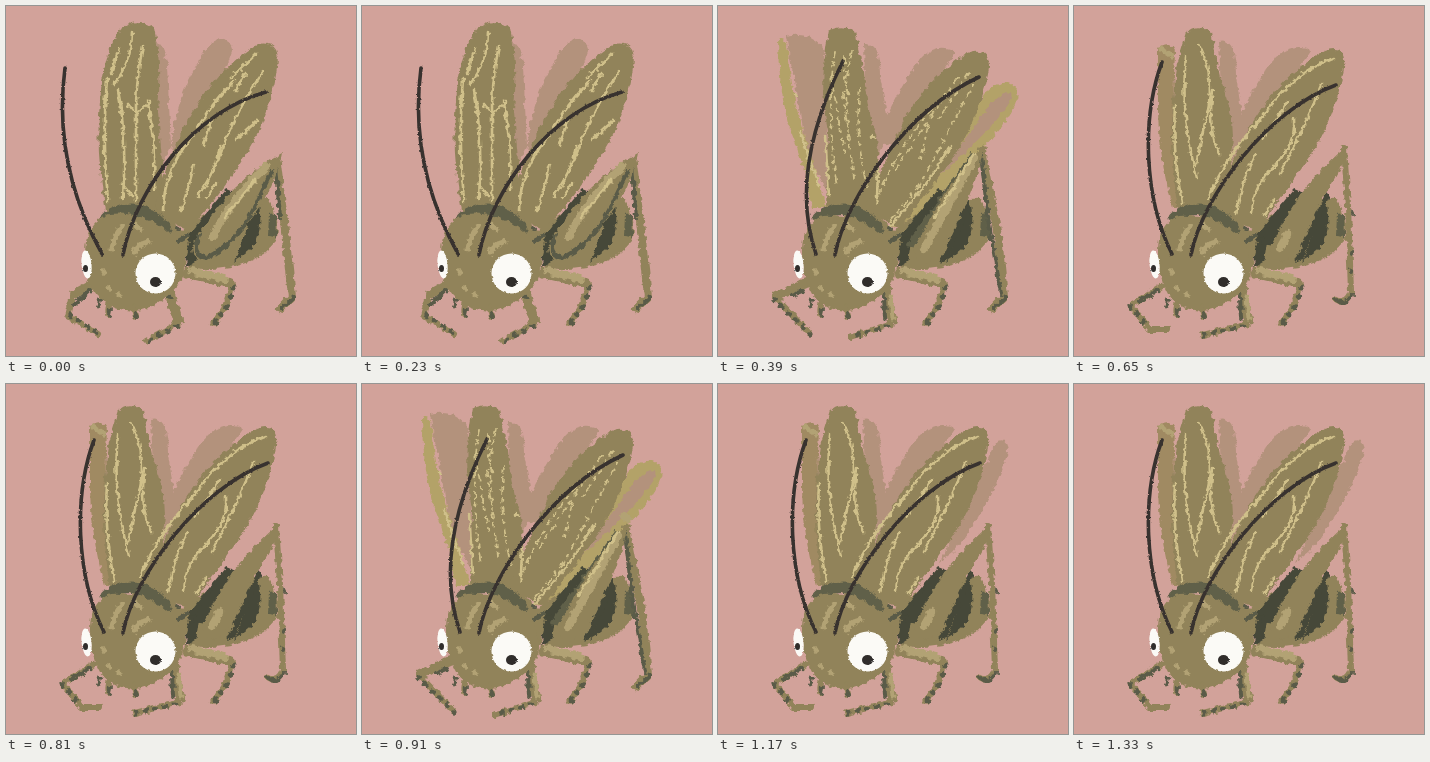
These frames come from a looping animation (350x350 px, 1430 ms). An HTML page:

```html
<!DOCTYPE html>
<html lang="en">
<head>
<meta charset="utf-8">
<title>Cricket</title>
<style>
html, body { margin: 0; width: 100%; height: 100%; overflow: hidden; background: #d2a29a }
svg { display: block; width: 100vw; height: 100vh }
path { stroke-linecap: round; stroke-linejoin: round }
.olive { fill: #91835a }
.tan { fill: #b3a268 }
.umber { fill: #a08a62 }
.shade { fill: #b3927c }
.dark { fill: #464839 }
.moss { fill: #606049 }
.vein { fill: none; stroke: #d0c08a; stroke-width: 2.6 }
.fine { stroke-width: 1.8; stroke-dasharray: 7 5 3 6 }
.glow { fill: none; stroke: #b2a274; stroke-width: 5 }
.wide { stroke-width: 8 }
.limb { fill: none; stroke: #91835a; stroke-width: 10 }
.thin { stroke-width: 6 }
.shin { stroke-width: 8 }
.edge { fill: none; stroke: #5a5b48; stroke-width: 4 }
.rim { fill: none; stroke: #606049; stroke-width: 11 }
.spur { fill: none; stroke: #5a5b48; stroke-width: 5; stroke-dasharray: 1 9 }
.feeler { fill: none; stroke: #38322f; stroke-width: 3.6 }
.white { fill: #fbfaf6 }
.black { fill: #302d2b }
</style>
</head>
<body>
<svg viewBox="0 0 350 350">
<defs>
  <filter id="rough" filterUnits="userSpaceOnUse" x="0" y="0" width="350" height="350" color-interpolation-filters="sRGB">
    <feTurbulence type="fractalNoise" baseFrequency=".2" numOctaves="2" seed="4"/>
    <feDisplacementMap in="SourceGraphic" scale="6" xChannelSelector="R" yChannelSelector="G"/>
  </filter>
  <filter id="chalk" filterUnits="userSpaceOnUse" x="0" y="0" width="350" height="350" color-interpolation-filters="sRGB">
    <feTurbulence type="fractalNoise" baseFrequency=".4" numOctaves="2" seed="7"/>
    <feDisplacementMap in="SourceGraphic" scale="2.5" xChannelSelector="R" yChannelSelector="G"/>
  </filter>
</defs>

<g filter="url(#rough)">
  <!-- wings -->
  <g data-on="0">
    <path class="shade" d="M143 32Q159 34 161 60L165 140L150 170ZM205 37Q222 26 227 43Q212 92 165 148Q168 85 205 37Z"/>
    <path class="olive" d="M116 22Q134 10 148 22Q156 55 152 105L160 205H100Q89 145 94 95Q98 42 116 22Z"/>
    <path class="olive" d="M252 38Q276 34 271 62Q265 112 235 155Q215 190 182 224L148 208Q158 155 185 110Q208 65 252 38Z"/>
    <path class="vein" d="M101 72Q96 130 102 195M126 27Q125 58 108 78M113 42L105 68M137 40Q131 68 130 98V194M112 84Q121 130 117 192M122 98L130 108L144 95M142 96Q150 145 148 183M116 178L126 190"/>
    <path class="vein" d="M157 206Q157 165 188 128Q205 98 228 75M175 204Q184 178 188 158M192 190Q212 160 220 132Q238 92 257 66M225 72L249 49M239 68L229 86M206 112L198 140M214 140L210 160M230 134L252 114M210 178L201 192"/>
  </g>
  <g data-on="13">
    <path class="shade" d="M68 30Q90 25 106 42L112 190L90 150ZM146 38Q162 36 162 70L172 125L150 170ZM205 50Q222 36 238 46L175 140L158 135Q178 84 205 50Z"/>
    <path class="tan" d="M60 34Q67 29 70 44Q74 100 94 152L108 202H94Q86 155 70 118Q60 75 60 34Z"/>
    <path class="tan" d="M270 84Q292 68 300 87Q299 106 258 150L205 208L172 222Z"/>
    <path class="shade" d="M270 101Q290 78 294 91Q288 108 245 148L216 176Z"/>
    <path class="olive" d="M111 25Q122 18 137 24L146 66Q148 102 159 132L164 205H108L110 125Q100 80 111 25Z"/>
    <path class="olive" d="M248 48Q272 40 271 62Q266 100 234 154L182 222L145 205L187 112Q212 70 248 48Z"/>
    <path class="vein fine" d="M117 45Q108 100 119 182M134 45L125 90L136 172M113 70L127 150M142 82Q136 130 150 185M126 50L130 125"/>
    <path class="vein fine" d="M158 198Q175 144 225 91M171 216Q204 180 221 143L257 75M177 164L241 70M210 119L202 158M251 66L221 113"/>
    <path class="vein" d="M160 164L159 192M173 220L208 178L233 140M76 87L79 91M128 83L132 89M154 130L157 132M82 125L101 181M107 130L111 190"/>
  </g>
  <g data-on="24">
    <path class="shade" d="M145 35Q162 30 162 70L171 130L150 170ZM203 50Q222 36 237 44L170 145L158 130Q176 82 203 50Z"/>
    <path class="shade" data-on="4" d="M278 58Q290 52 290 68Q272 125 235 168L222 178Z"/>
    <path class="umber" d="M84 42Q96 33 101 45L98 126L112 202H99Q83 145 84 92Z"/>
    <path class="glow" d="M87 43L98 50"/>
    <path class="olive" d="M113 26Q124 17 137 25L146 72Q159 102 159 132L151 205H104Q93 130 102 62Z"/>
    <path class="olive" d="M250 45Q273 37 270 63Q262 108 235 152L184 224L128 204Q151 174 168 135Q199 75 250 45Z"/>
    <path class="vein" d="M112 50Q106 110 123 172M125 38Q144 75 130 120L122 158M101 100Q98 140 108 197M139 84Q133 120 145 148"/>
    <path class="vein" d="M135 192Q151 150 188 112Q216 68 260 52M162 207Q169 172 181 148M177 207Q179 180 202 158Q222 137 220 113M188 132Q204 114 213 96M248 78Q232 118 206 168M190 209L201 193"/>
  </g>

  <!-- abdomen -->
  <path class="olive" d="M172 226Q220 190 262 193Q276 215 270 236Q244 268 184 262Z"/>
  <path class="dark" d="M181 231L220 183L230 187L200 239ZM243 207L251 193Q259 218 248 240L228 256Q241 231 243 207Z"/>
  <path class="moss" d="M263 208L270 207L271 231L262 230Z"/>
  <path class="dark" d="M182 232L194 230L190 256L180 262Z"/>

  <!-- hind leg -->
  <g data-on="0">
    <path class="limb shin" d="M271 158L278 215L286 291L274 303"/>
    <path class="edge" d="M270 160L274 212M288 291L276 302"/>
    <path class="olive" d="M276 147Q270 183 240 220Q213 258 190 251Q179 244 193 228Q226 174 276 147Z"/>
    <path class="edge" d="M193 229Q184 250 201 252Q232 236 248 202L266 165"/>
    <path class="glow wide" d="M260 160Q225 195 206 231"/>
    <path class="vein" d="M249 174L219 211"/>
  </g>
  <g data-on="13">
    <path class="limb shin" d="M264 144L270 175L280 230L286 291L274 303"/>
    <path class="edge" d="M263 148L270 212L283 288M288 291L276 302"/>
    <path class="moss" d="M254 146L262 150L200 242L187 240Z"/>
    <path class="olive" d="M266 138Q261 176 234 225L211 257Q192 257 197 240Q229 177 266 138Z"/>
    <path class="dark" d="M247 200L251 207L230 253L221 257Z"/>
    <path class="glow wide" d="M256 152L206 243"/>
    <path class="vein" d="M256 148L217 211"/>
    <path class="glow wide" data-on="3" d="M262 132L266 135"/>
  </g>
  <g data-on="24">
    <path class="limb thin" d="M270 142L274 200L277 286Q272 300 262 294"/>
    <path class="edge" d="M279 207V208M279 246V247M277 264V265M278 289Q270 302 262 294"/>
    <path class="dark" d="M186 238L216 192L226 192L202 240ZM252 186L256 190L229 253L220 256Z"/>
    <path class="olive" d="M274 139Q271 161 247 194L217 253Q194 260 198 238Q222 183 274 139Z"/>
    <path class="glow wide" d="M214 228L206 242"/>
  </g>

  <!-- front legs -->
  <path class="limb thin" d="M226 279L218 303L207 318"/>
  <path class="limb" d="M181 267L223 277"/>
  <path class="glow wide" d="M187 265L218 273"/>
  <path class="spur" d="M228 281L220 303L207 319"/>
  <g data-on="0">
    <path class="limb" d="M163 286L172 314M87 278L69 288"/>
    <path class="limb thin" d="M173 317L141 335M67 290L62 310L92 328"/>
    <path class="edge" d="M165 291L155 289M84 284L68 299"/>
    <path class="spur" d="M171 320L143 335M64 309L92 328"/>
  </g>
  <g data-on="13">
    <path class="limb" d="M168 284L174 314M88 277L58 291"/>
    <path class="limb thin" d="M173 318L133 331M59 293L91 327"/>
    <path class="glow" d="M173 291L175 312"/>
    <path class="edge" d="M166 290L167 312M85 285L74 289"/>
    <path class="spur" d="M169 320L133 331M56 293L92 328"/>
  </g>
  <g data-on="24">
    <path class="limb" d="M168 284L174 314"/>
    <path class="limb thin" d="M88 280L57 300L76 323L94 323M173 318L129 329"/>
    <path class="glow" d="M173 291L175 312"/>
    <path class="edge" d="M166 290L167 312M84 284L66 295"/>
    <path class="spur" d="M169 320L130 329M56 300L75 323"/>
  </g>

  <!-- head -->
  <path class="olive" d="M120 200Q162 200 184 236L178 262L145 245Z"/>
  <path class="rim" d="M100 212Q132 190 160 223"/>
  <path class="edge" d="M171 222L173 223M172 235L181 230"/>
  <path class="olive" data-on="0" d="M79 245Q80 216 103 208Q142 204 167 232Q180 250 176 273Q160 298 132 305Q105 305 91 289Q78 274 79 245Z"/>
  <path class="olive" data-on="1234" d="M84 245Q84 217 105 210Q143 208 169 235Q180 253 174 277Q160 297 132 305Q106 305 94 288Q83 270 84 245Z"/>
  <path class="limb thin" d="M103 299L102 308M128 302L130 310"/>
  <path class="edge" d="M94 294L92 301M104 304L103 309M129 307L131 311"/>
  <path class="glow" d="M116 221Q107 230 106 244M128 247Q133 238 142 236M129 218L134 223M103 282L104 283M113 289L114 290M97 265L98 266"/>
</g>

<!-- eyes and feelers -->
<g filter="url(#chalk)">
  <circle class="white" cx="149.500" cy="267.500" r="20"/>
  <ellipse class="black" cx="149.500" cy="276" rx="5.500" ry="5"/>
  <ellipse class="white" cx="80.500" cy="258.500" rx="5" ry="14" transform="rotate(-6 80 258)"/>
  <ellipse class="black" cx="79.500" cy="262.500" rx="2.500" ry="3.500"/>
  <path class="feeler" data-on="0" d="M59 62C50 130 64 190 96 248M117 249C130 180 190 105 260 86"/>
  <path class="feeler" data-on="13" d="M125 55C90 125 78 190 98 248M117 249C128 190 190 104 261 71"/>
  <path class="feeler" data-on="24" d="M88 56C68 110 69 190 98 248M117 249C128 190 195 103 262 79"/>
</g>
</svg>
<script>
const parts = document.querySelectorAll('[data-on]');
const LOOP = 1430, HOLD = 390, STEP = 260;
let shown = -1;

function draw() {
  const t = performance.now() % LOOP;
  const pose = t < HOLD ? 0 : 1 + Math.floor((t - HOLD) / STEP);
  if (pose !== shown) {
    for (const part of parts) part.style.display = part.dataset.on.includes(pose) ? '' : 'none';
    shown = pose;
  }
  requestAnimationFrame(draw);
}
draw();
</script>
</body>
</html>
```
